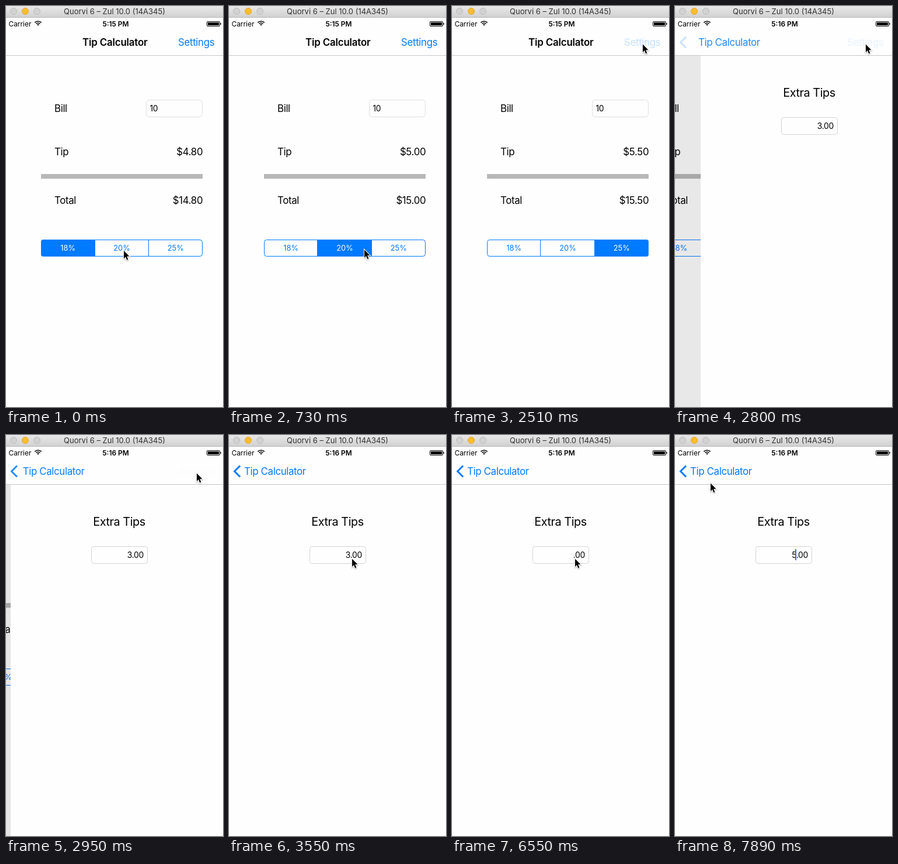
An HTML page with a canvas for the animation above (8000 ms loop, 372x685 px).

```html
<!DOCTYPE html>
<html lang="en">
<head>
<meta charset="utf-8">
<title>Tip Calculator</title>
<style>
  html, body { margin: 0; width: 372px; height: 685px; overflow: hidden; background: #fefefe; }
  canvas { display: block; }
</style>
</head>
<body>
<canvas id="stage" width="372" height="685"></canvas>
<script>
const ctx = document.getElementById('stage').getContext('2d');
const W = 372, H = 685, LOOP = 8000, STEP = 148.9;
const BLUE = '#007aff', PAPER = '#fefefe', NAV_BOTTOM = 85;
const RATES = [18, 20, 25];
const SETTINGS_TAP = 2510, PUSH_START = 2560;

// Pointer moves: begin, end, destination.
const MOVES = [
  { from: 520, to: 1180, x: 313, y: 411 },
  { from: 1480, to: 1940, x: 324, y: 40 },
  { from: 1940, to: 2200, x: 326, y: 64 },
  { from: 3100, to: 3550, x: 210, y: 210 },
  { from: 7600, to: 7890, x: 60, y: 81 }
];

// Editing of the extra tip; the bar marks the caret.
const EDITS = [
  [0, '3.00'], [4150, '3.00|'], [4600, '3.0|0'], [4900, '3.|00'],
  [5050, '3|.00'], [5800, '|.00'], [7440, '5|.00']
];

const clamp = v => Math.min(1, Math.max(0, v));
const smooth = v => v * v * (3 - 2 * v);

function setFont(size, weight = 400) {
  const tracking = size < 13.5 ? 0 : weight > 400 ? -.01 : -.022;
  ctx.font = `${weight} ${size}px Inter, sans-serif`;
  ctx.letterSpacing = `${tracking * size}px`;
}

function text(str, x, y, size, { align = 'left', color = '#000', weight, alpha = 1 } = {}) {
  setFont(size, weight);
  ctx.globalAlpha = alpha;
  ctx.textAlign = align;
  ctx.fillStyle = color;
  ctx.fillText(str, x, y);
  ctx.globalAlpha = 1;
}

function rect(x, y, w, h, color) {
  ctx.fillStyle = color;
  ctx.fillRect(x, y, w, h);
}

function disc(x, y, fill, edge) {
  ctx.beginPath();
  ctx.arc(x, y, 5.5, 0, 7);
  ctx.fillStyle = fill;
  ctx.fill();
  ctx.strokeStyle = edge;
  ctx.lineWidth = 1;
  ctx.stroke();
}

function roundBox(x, y, w, h, r, color) {
  ctx.beginPath();
  ctx.roundRect(x, y, w, h, r);
  ctx.strokeStyle = color;
  ctx.lineWidth = 1;
  ctx.stroke();
}

function windowBar() {
  const shade = ctx.createLinearGradient(0, 0, 0, 19);
  shade.addColorStop(0, '#e9e8e9');
  shade.addColorStop(1, '#d2d1d2');
  rect(0, 0, W, 19, shade);
  rect(0, 19, W, 1, '#b9b8b9');
  disc(13, 9, '#d3d2d3', '#bdbcbd');
  disc(33, 9, '#fdbe2e', '#e3a52a');
  disc(53, 9, '#d3d2d3', '#bdbcbd');
  text('Quorvi 6 – Zul 10.0 (14A345)', 186, 14, 13, { align: 'center', color: '#303030' });
}

function statusBar(clock) {
  text('Carrier', 4.5, 34.5, 11.9);
  ctx.strokeStyle = '#000';
  ctx.lineWidth = 1.6;
  for (const r of [2, 5, 8]) {
    ctx.beginPath();
    ctx.arc(55, 34, r, -Math.PI * .75, -Math.PI * .25);
    ctx.stroke();
  }
  text(clock, 188, 34.5, 11.9, { align: 'center', weight: 600 });
  roundBox(344.5, 26.5, 22, 8, 1.5, '#000');
  rect(346, 28, 19, 5, '#000');
  rect(367.5, 29, 1.2, 3, '#000');
}

function navBar(push, pressed) {
  text('Tip Calculator', 131 - 105 * push, 68, 16.9, { weight: 600, alpha: clamp(1 - 1.3 * push) });
  text('Tip Calculator', 26 + 118 * (1 - push), 68, 16.9, { color: BLUE, alpha: push });
  text('Settings', 357.2, 68, 16.9,
    { align: 'right', color: BLUE, alpha: pressed ? .22 * (1 - push ** 4) : 1 });
  ctx.globalAlpha = clamp((push - .85) / .15);
  ctx.strokeStyle = BLUE;
  ctx.lineWidth = 3;
  ctx.stroke(new Path2D('M19 52.5L9.5 62L19 71.5'));
  ctx.globalAlpha = 1;
  rect(0, 84, W, 1, '#c8c8c8');
}

function segments(choice) {
  const x = 60, y = 399, w = 277, h = 29, step = w / RATES.length;
  ctx.save();
  ctx.beginPath();
  ctx.roundRect(x, y, w, h, 4);
  ctx.clip();
  rect(Math.floor(x + step * choice), y, Math.ceil(step), h, BLUE);
  ctx.restore();
  roundBox(x + .5, y + .5, w - 1, h - 1, 4, BLUE);
  RATES.forEach((rate, i) => {
    if (i) rect(Math.floor(x + step * i - .5), y, 1, h, BLUE);
    text(`${rate}%`, x + step * (i + .5), 418, 12.9,
      { align: 'center', color: i === choice ? '#fff' : BLUE });
  });
}

function billView(choice) {
  const bill = 10, tip = bill * RATES[choice] / 100 + 3;
  const row = (label, amount, y) => {
    text(label, 83, y, 16.9);
    if (amount) text('$' + amount.toFixed(2), 337.2, y, 16.9, { align: 'right' });
  };
  row('Bill', 0, 181);
  roundBox(240.5, 160.5, 96, 29, 5, '#dedede');
  text(bill, 246.5, 179.5, 13.9);
  row('Tip', tip, 254.5);
  rect(60, 287, 277, 8, '#b8b8b8');
  row('Total', bill + tip, 337.5);
  segments(choice);
}

function extraView(t) {
  const [since, content] = EDITS.findLast(([time]) => time <= t);
  const [head, tail] = content.split('|');
  const right = 228;
  rect(0, NAV_BOTTOM, W, H, PAPER);
  text('Extra Tips', 186, 154.5, 19.84, { align: 'center' });
  roundBox(138.5, 190.5, 96, 29, 4, '#d4d4d4');
  text(head + (tail ?? ''), right, 209.5, 13.9, { align: 'right' });
  if (tail === undefined) return;
  // The caret fades out and back once per 1.2 s after each edit.
  const phase = (t - since) % 1200;
  ctx.globalAlpha = clamp((Math.abs(phase - 825) - 75) / 295);
  rect(Math.round(right - 1.6 - ctx.measureText(tail).width), 195, 2, 19, '#426bf2');
  ctx.globalAlpha = 1;
}

function pointer(t) {
  let x = 201, y = 416.5;
  for (const move of MOVES) {
    const k = smooth(clamp((t - move.from) / (move.to - move.from)));
    x += (move.x - x) * k;
    y += (move.y - y) * k;
  }
  const arrow = new Path2D('M0 0V13.4L3 10.6L5.2 15.8L7.4 14.9L5.2 9.8L9.4 9.6Z');
  ctx.save();
  ctx.translate(x + 1, y + 1.5);
  ctx.shadowColor = 'rgba(0,0,0,.35)';
  ctx.shadowBlur = 2;
  ctx.shadowOffsetY = 1;
  ctx.strokeStyle = '#fff';
  ctx.lineWidth = 2;
  ctx.stroke(arrow);
  ctx.shadowColor = 'transparent';
  ctx.fillStyle = '#000';
  ctx.fill(arrow);
  ctx.restore();
}

// Critically damped spring.
function pushProgress(t) {
  const k = Math.max(0, t - PUSH_START) * .01365;
  return 1 - (1 + k) * Math.exp(-k);
}

function draw(time) {
  // The screen refreshes in even steps.
  const t = Math.floor((time + 30) / STEP) * STEP;
  const push = pushProgress(t);
  const edge = Math.round(W * (1 - push));
  const choice = t < 440 ? 0 : t < 1480 ? 1 : 2;
  rect(0, 0, W, H, PAPER);

  ctx.save();
  ctx.beginPath();
  ctx.rect(0, NAV_BOTTOM, W, H);
  ctx.clip();
  ctx.save();
  ctx.translate(Math.round(-.3 * W * push), 0);
  billView(choice);
  ctx.restore();
  rect(0, NAV_BOTTOM, edge, H, `rgba(0,0,0,${.1 * push})`);
  ctx.translate(edge, 0);
  extraView(t);
  ctx.restore();

  windowBar();
  statusBar(t < PUSH_START ? '5:15 PM' : '5:16 PM');
  navBar(push, t >= SETTINGS_TAP);
  pointer(t);
}

const start = performance.now();
function tick() {
  draw((performance.now() - start) % LOOP);
  requestAnimationFrame(tick);
}
tick();
</script>
</body>
</html>
```
